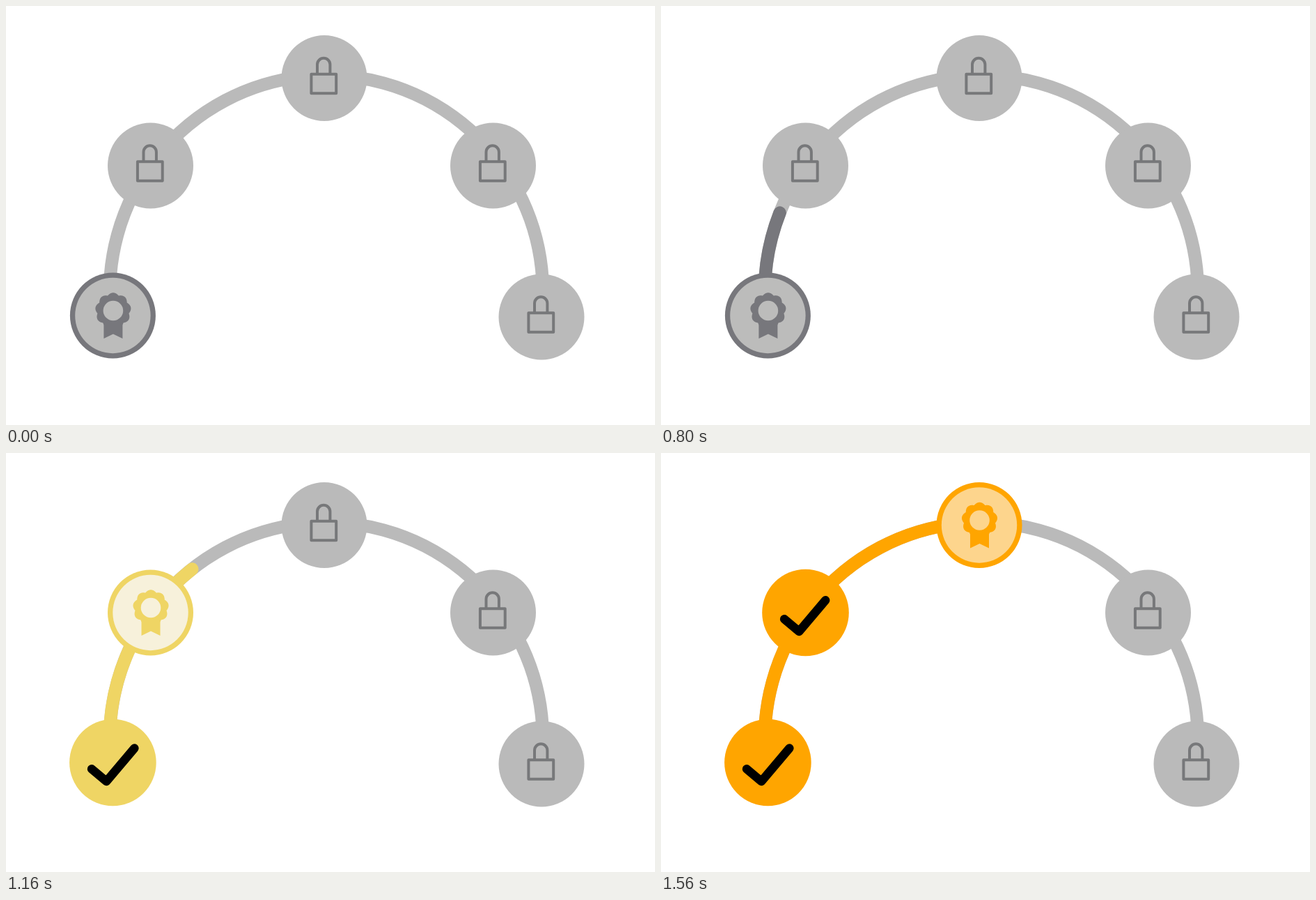
Recreate the animation shown at these times as an HTML page with a canvas. Size 932x601 px, loop 1.6 s.

```html
<!DOCTYPE html>
<html lang="en">
<head>
<meta charset="utf-8">
<title>Milestone arc</title>
<style>
  html, body { margin: 0; width: 100%; height: 100%; overflow: hidden; background: #fff; }
  canvas { display: block; }
</style>
</head>
<body>
<canvas id="stage" width="932" height="601"></canvas>
<script>
const ctx = document.getElementById('stage').getContext('2d');
const TAU = Math.PI * 2;
const LOOP = 1600, STEP = 40, HOLD = 320, STAGE_STEPS = 14;
const TRACK = { x: 460, y: 410.5, r: 311, width: 18.5 };
const GREY = '#bababa', LOCK = '#77787a';
const NODES = [[153.4, 444], [207.5, 229], [457, 103.5], [699.5, 229], [769, 446]];
const THEMES = [
  { main: '#77777c', fill: '#bcbcbb' },
  { main: '#efd564', fill: '#f7f1db' },
  { main: '#ffa500', fill: '#fdd58d' }
];
const CHECK = [[-30.4, 9.3], [-9.2, 27], [31, -20.5]];

const clamp = v => Math.max(0, Math.min(1, v));
const nodeAngle = ([x, y]) => {
  const a = Math.atan2(y - TRACK.y, x - TRACK.x);
  return a > Math.PI / 2 ? a - TAU : a;
};

function disc(x, y, r, color) {
  ctx.fillStyle = color;
  ctx.beginPath();
  ctx.arc(x, y, r, 0, TAU);
  ctx.fill();
}

function track(from, to, color) {
  ctx.strokeStyle = color;
  ctx.lineWidth = TRACK.width;
  ctx.lineCap = 'round';
  ctx.beginPath();
  ctx.arc(TRACK.x, TRACK.y, TRACK.r, from, to);
  ctx.stroke();
}

function lockNode() {
  disc(0, 0, 61.5, GREY);
  ctx.strokeStyle = LOCK;
  ctx.lineWidth = 4;
  ctx.lineJoin = 'round';
  ctx.lineCap = 'butt';
  ctx.strokeRect(-18.6, -5.8, 35.8, 27.6);
  ctx.beginPath();
  ctx.moveTo(-10, -6);
  ctx.lineTo(-10, -19.5);
  ctx.arc(-0.8, -19.5, 9.2, Math.PI, 0);
  ctx.lineTo(8.4, -6);
  ctx.stroke();
}

function badgeNode({ main, fill }) {
  disc(0, 0, 61.5, main);
  disc(0, 0, 54.2, fill);
  ctx.fillStyle = main;
  ctx.beginPath();
  for (let i = 0; i <= 180; i++) {
    const a = i / 180 * TAU;
    const r = 22.8 + 3 * Math.abs(Math.cos(a * 4.5));
    ctx.lineTo(0.5 + r * Math.sin(a), -7 - r * Math.cos(a));
  }
  ctx.fill();
  ctx.beginPath();
  ctx.moveTo(-13, 8);
  ctx.lineTo(-13, 33);
  ctx.lineTo(0.5, 26.5);
  ctx.lineTo(14, 33);
  ctx.lineTo(14, 8);
  ctx.fill();
  disc(0.5, -7, 14.3, fill);
}

function checkNode(color, progress) {
  disc(0, 0, 62.3, color);
  const [a, b, c] = CHECK;
  const first = Math.hypot(b[0] - a[0], b[1] - a[1]);
  const second = Math.hypot(c[0] - b[0], c[1] - b[1]);
  const drawn = progress * (first + second);
  const lineToward = (p, q, k) => ctx.lineTo(p[0] + (q[0] - p[0]) * k, p[1] + (q[1] - p[1]) * k);
  ctx.strokeStyle = '#000';
  ctx.lineWidth = 12.5;
  ctx.lineCap = ctx.lineJoin = 'round';
  ctx.beginPath();
  ctx.moveTo(...a);
  lineToward(a, b, clamp(drawn / first));
  if (drawn > first) lineToward(b, c, clamp((drawn - first) / second));
  ctx.stroke();
}

// The next colour opens inside the badge just before the stage switches.
function openingDisc(color) {
  disc(0, 0, 44.5, color);
  disc(CHECK[0][0], CHECK[0][1] + 0.7, 7, 'rgba(0,0,0,.65)');
}

function draw(time) {
  const tick = Math.max(0, Math.floor((time - HOLD) / STEP));
  const stage = Math.floor(tick / STAGE_STEPS);
  const step = tick % STAGE_STEPS;
  const theme = THEMES[stage];
  const start = nodeAngle(NODES[0]);
  const here = nodeAngle(NODES[stage]);
  const next = nodeAngle(NODES[stage + 1]);
  const travel = clamp((step - 2.9) * 0.0726);

  ctx.fillStyle = '#fff';
  ctx.fillRect(0, 0, 932, 601);
  track(start, nodeAngle(NODES[4]), GREY);
  track(start, here + (next - here) * travel, theme.main);

  NODES.forEach(([x, y], i) => {
    ctx.save();
    ctx.translate(x, y);
    if (i > stage) lockNode();
    else if (i < stage) checkNode(theme.main, i === stage - 1 ? clamp((step + 1) * 0.24) : 1);
    else {
      badgeNode(theme);
      if (step === STAGE_STEPS - 1) openingDisc(stage ? '#f9b027' : '#ebd168');
    }
    ctx.restore();
  });
}

const began = performance.now();
function frame() {
  draw((performance.now() - began) % LOOP);
  requestAnimationFrame(frame);
}
frame();
</script>
</body>
</html>
```
